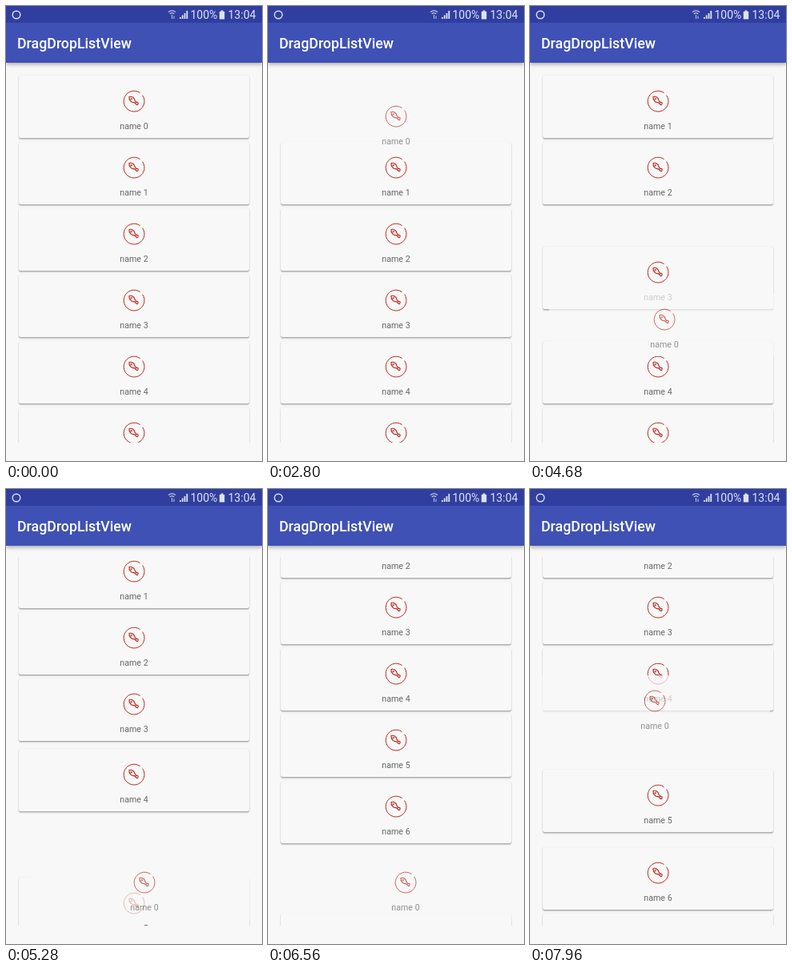
Write an HTML page that moves like this. It is 320 by 569 pixels and loops after 8000 ms.

```html
<!DOCTYPE html>
<html lang="en">
<head>
<meta charset="utf-8">
<title>DragDropListView</title>
<style>
  html, body { margin: 0; width: 100%; height: 100%; overflow: hidden; background: #f8f8f8; }
  #stage { position: relative; width: 320px; height: 569px; overflow: hidden; background: #f8f8f8; font-family: Roboto, sans-serif; }
  #status { position: absolute; left: 0; top: 0; }
  #bar {
    position: absolute; left: 0; top: 21px; width: 320px; height: 50px; background: #3f51b5;
    box-shadow: 0 2px 5px rgba(0, 0, 0, .32);
    color: #fff; font-size: 17.78px; font-weight: 500; line-height: 53px; text-indent: 14px;
  }
  #list { position: absolute; left: 0; top: 85px; width: 320px; height: 461px; overflow: hidden; }
  .card {
    position: absolute; left: 16px; top: 2px; width: 288px; height: 78px;
    border-radius: 2px; background: #f8f8f8; color: #666;
    box-shadow: 0 1.4px 1.6px rgba(0, 0, 0, .32), 0 0 1px rgba(0, 0, 0, .16);
    font-size: 10.67px; line-height: 14px; text-align: center;
  }
  .card svg { position: absolute; left: 129px; top: 17px; }
  .card span { position: absolute; left: 0; top: 57px; width: 100%; }
  .card.drag { z-index: 1; opacity: .7; box-shadow: none; }
</style>
</head>
<body>
<div id="stage">
  <div id="bar">DragDropListView</div>
  <svg id="status" width="320" height="21" fill="#dfe2f3" font-family="Roboto, sans-serif" font-size="14">
    <rect width="320" height="21" fill="#303f9f"/>
    <circle cx="13" cy="11" r="4.8" fill="none" stroke="#dfe2f3" stroke-width="1.4"/>
    <g fill="none" stroke="#dfe2f3" stroke-width="1.1">
      <path d="M203 7.6Q207.5 4 212 7.6M204.8 9.8Q207.5 7.6 210.2 9.8"/>
      <path d="M207.5 11v5M210 12.5v3.5" opacity=".8"/>
    </g>
    <path d="M217 14h1.8v2H217zM219.8 11.5h1.8v4.5h-1.8zM222.6 9h1.8v7h-1.8zM225.4 6h1.8v10h-1.8z"/>
    <text x="230.5" y="16">100%</text>
    <path d="M268.5 5.5h3v1.5h1.7v9.5h-6.4v-9.5h1.7z"/>
    <text x="277.5" y="16">13:04</text>
  </svg>
  <div id="list"></div>
</div>
<script>
const LOOP = 8000, STEP = 40, PITCH = 83, PICK = 2360, SWAP = 300;

// [time, dx, dy] of the finger and [time, y] of the list scroll
const finger = [
  [2360, 0, 0], [2700, 0, 8], [3360, 3, 83], [3560, 4, 97], [4020, 6, 166],
  [4545, 8, 249], [4680, 8, 273], [5030, 11, 332], [5370, 14, 388], [5670, 16, 412],
  [5720, 16, 414], [6050, 16, 414], [6600, 12, 370], [7120, 7, 293], [7190, 6, 278],
  [7740, -2, 195], [7960, -4, 146]
];
const scroll = [[5170, 0], [5720, 81.5], [6090, 137]];

// When each row gives way upwards, and when it moves back
const upAt = [, 3360, 4020, 4545, 5030, 5370, 5670];
const backAt = { 5: 7740, 6: 7190 };

const icon = `<svg width="30" height="30" viewBox="-15 -15 30 30" fill="none" stroke="#b9281e">
  <path d="M10.6 -7.4A12.9 12.9 0 1 1 7.6 -10.4"/>
  <path stroke-width="1.2" stroke-linejoin="round" d="M-6 -5.5C-2.5 -6.5 .5 -4 1 -1L2.8 1.6C4 .8 5.6 1.8 5 3.2C4.8 5 3 5.2 2.6 3.4L.2 1.6C-3 2.2 -6.5 -1 -6 -5.5Z"/>
  <circle cx="-3.3" cy="-2.8" r=".8"/>
</svg>`;

const list = document.getElementById('list');
const cards = Array.from({ length: 9 }, (_, i) => {
  const card = document.createElement('div');
  card.className = 'card';
  card.innerHTML = `${icon}<span>name ${i}</span>`;
  list.append(card);
  return card;
});

function track(keys, t, k) {
  const n = keys.findIndex(key => key[0] > t);
  if (n === 0) return keys[0][k];
  if (n < 0) return keys[keys.length - 1][k];
  const a = keys[n - 1], b = keys[n];
  return a[k] + (b[k] - a[k]) * (t - a[0]) / (b[0] - a[0]);
}

function ease(t, start) {
  if (start === undefined) return 0;
  const x = Math.min(1, Math.max(0, (t - start) / SWAP));
  return (1 - Math.cos(Math.PI * x)) / 2;
}

function place(card, x, y) {
  card.style.transform = `translate(${Math.round(x)}px, ${Math.round(y)}px)`;
}

function draw(t) {
  const top = track(scroll, t, 1);
  cards.forEach((card, i) => {
    if (i) place(card, 0, (i - ease(t, upAt[i]) + ease(t, backAt[i])) * PITCH - top);
  });
  cards[0].classList.toggle('drag', t >= PICK);
  place(cards[0], track(finger, t, 1), track(finger, t, 2));
}

const begin = performance.now();
function tick() {
  const t = (performance.now() - begin) % LOOP;
  draw(Math.floor(t / STEP) * STEP);
  requestAnimationFrame(tick);
}
tick();
</script>
</body>
</html>
```
